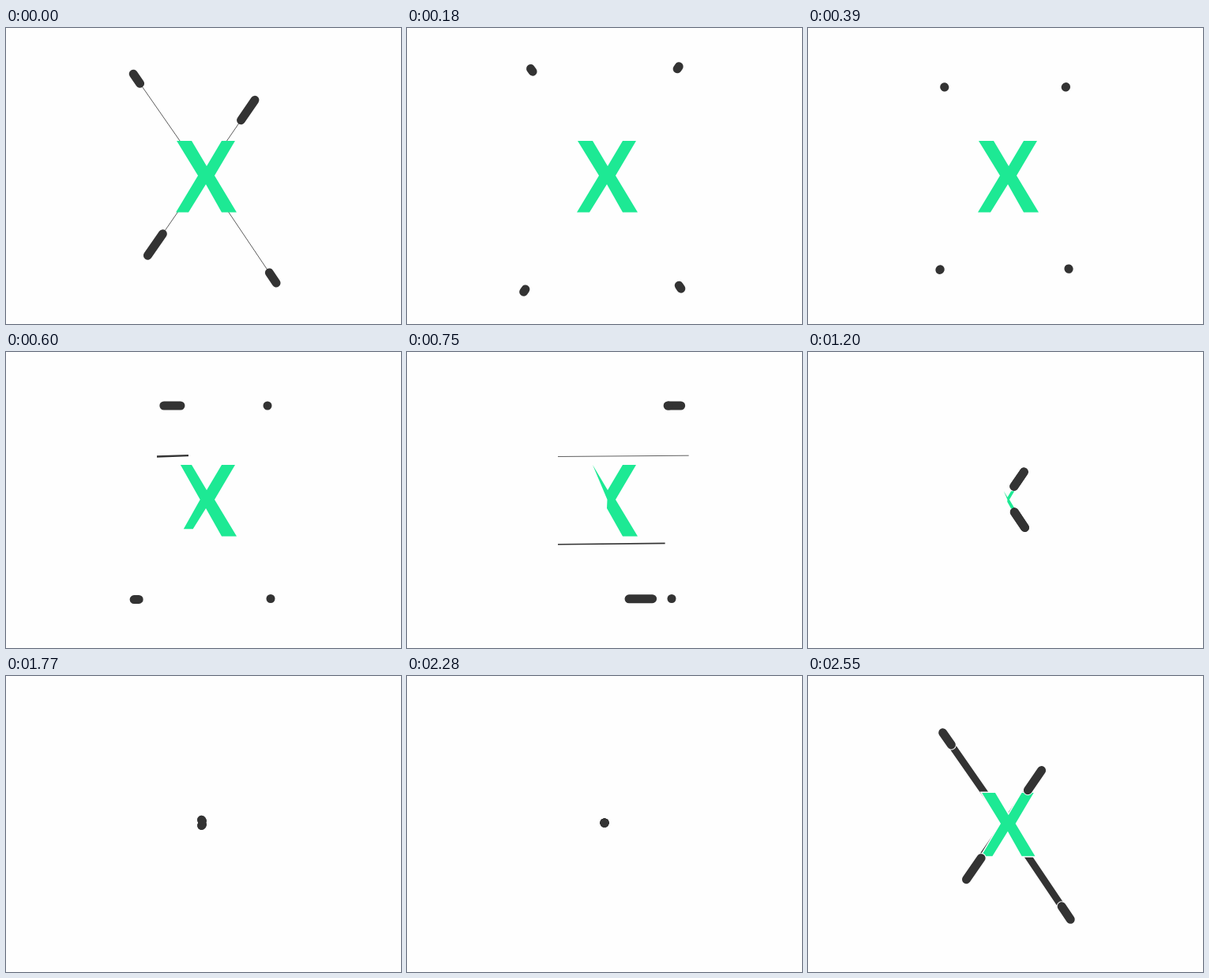
Write an HTML page with a canvas that moves like this. It is 500 px wide and 375 px high and loops after 2.58 s.

```html
<!DOCTYPE html>
<html lang="en">
<head>
<meta charset="utf-8">
<title>X loop</title>
<style>
  html, body { margin: 0; width: 100%; height: 100%; overflow: hidden; background: #fefefe; }
  canvas { display: block; }
</style>
</head>
<body>
<canvas id="stage" width="500" height="375"></canvas>
<script>
const ctx = document.getElementById('stage').getContext('2d');
const LOOP = 2580, LAG = 27, CX = 250, CY = 186;
const DARK = '#333', GREEN = '#1de994', PAPER = '#fefefe';

// Sine-eased track through [time, value] keys.
function track(t, keys) {
  if (t <= keys[0][0]) return keys[0][1];
  for (let i = 1; i < keys.length; i++) {
    const [t0, a] = keys[i - 1], [t1, b] = keys[i];
    if (t < t1) return a + (b - a) * (1 - Math.cos(Math.PI * (t - t0) / (t1 - t0))) / 2;
  }
  return keys[keys.length - 1][1];
}

// Distance from the centre: spring out, rest, spring back in.
const settle = [[540, 1], [1003, 1], [1305, -.18], [1600, .06], [1785, -.03], [1960, .01], [2100, 0]];
const early = [[-265, 0], [65, 1.19], [365, .94], ...settle];
const late = [[-140, 0], [90, 1.19], [390, .94], ...settle];

// Left dots slide over to the right ones.
const topSlide = [[489, 0], [809, 1.19], [950, .96], [1060, 1]];
const bottomSlide = [[570, 0], [850, 1.19], [970, .96], [1070, 1]];
const still = [[0, 0]];

const dots = [
  { from: [-82, -118], to: [81, -118], spread: early, slide: topSlide },
  { from: [81, -118], to: [81, -118], spread: late, slide: still },
  { from: [-88, 127.5], to: [85, 126.5], spread: late, slide: bottomSlide },
  { from: [85, 126.5], to: [85, 126.5], spread: early, slide: still }
];

const trailWidth = [[-300, 11], [-30, 9], [0, .8], [40, 0]];
const letterScale = [[-150, 0], [5, 1], [1020, 1], [1290, 0]];
const leftThinning = [[540, 0], [720, 1]];

function place(dot, t) {
  const r = track(t, dot.spread), s = track(t, dot.slide);
  return [0, 1].map(i => [CX, CY][i] + r * (dot.from[i] + s * (dot.to[i] - dot.from[i])));
}

function line(a, b, width, color, cap = 'round') {
  if (width <= 0) return;
  ctx.lineWidth = width;
  ctx.strokeStyle = color;
  ctx.lineCap = cap;
  ctx.beginPath();
  ctx.moveTo(...a);
  ctx.lineTo(...b);
  ctx.stroke();
}

function speedLine(dot, t, y, reach) {
  const age = t - dot.slide[0][0];
  const end = place(dot, t)[0] + reach;
  if (age > 0 && end > 191) line([191, y + 1], [end, y - .3], 3.4 - age * .01, DARK, 'butt');
}

function letter(t, halo) {
  const scale = track(t, letterScale), k = track(t, leftThinning);
  if (scale <= 0) return;
  const points = [
    [216 + 19 * k, 143], [235, 143], [254, 175], [273, 143], [290, 143], [264, 187],
    [292, 233.5], [273, 233.5], [253, 198], [231 + 22 * k, 233.5 - 35.5 * k],
    [215 + 38 * k, 233.5 - 35.5 * k], [243 + 10.5 * k, 187]
  ];
  ctx.beginPath();
  for (const [x, y] of points) ctx.lineTo(CX + 2 + (x - CX - 2) * scale, 187 + (y - 187) * scale);
  ctx.closePath();
  if (halo) {
    ctx.lineWidth = 3;
    ctx.strokeStyle = PAPER;
    ctx.stroke();
  }
  ctx.fillStyle = GREEN;
  ctx.fill();
}

function draw(now) {
  const phase = now % LOOP;
  const t = phase > 2280 ? phase - LOOP : phase;
  const halo = t > -60 && t < -10;
  ctx.fillStyle = PAPER;
  ctx.fillRect(0, 0, 500, 375);

  for (const dot of dots) line([CX, CY], place(dot, t), t < 40 ? track(t, trailWidth) : 0, DARK);
  letter(t, halo);
  speedLine(dots[0], t, 131.5, 10);
  speedLine(dots[2], t, 242.7, 16);
  for (const dot of dots) {
    const head = place(dot, t), tail = place(dot, t - LAG);
    if (halo) line(head, tail, 13, PAPER);
    line(head, tail, 11, DARK);
  }
}

const start = performance.now();
function tick() {
  draw(performance.now() - start);
  requestAnimationFrame(tick);
}
tick();
</script>
</body>
</html>
```
